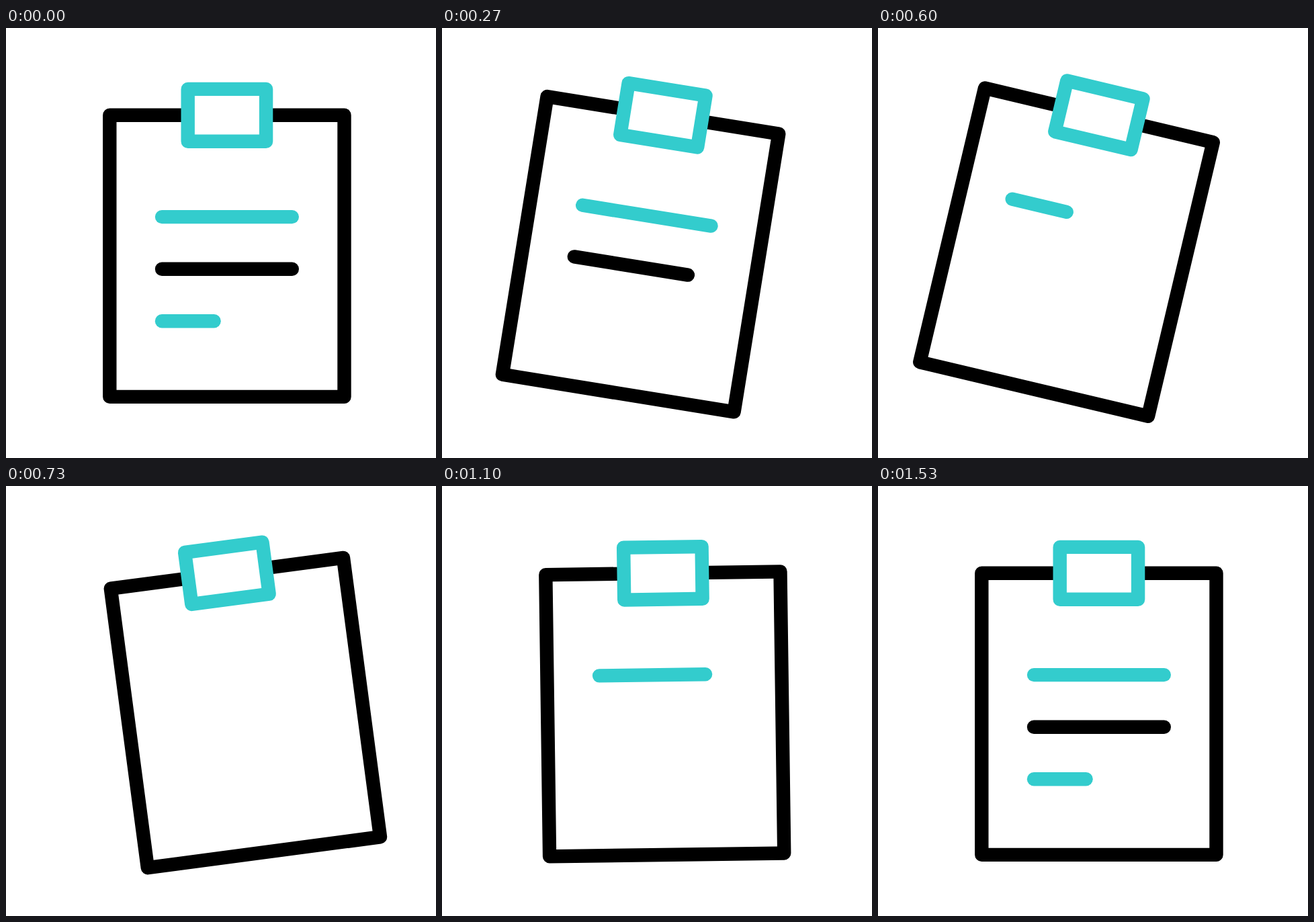
Animation, 640 px wide and 640 px high, one loop 2 s. Source, as an HTML page:

```html
<!DOCTYPE html>
<html lang="en">
<head>
<meta charset="utf-8">
<title>Clipboard</title>
<style>
  html, body { margin: 0; width: 100%; height: 100%; overflow: hidden; background: #fff; }
  svg { display: block; width: 100%; height: 100%; }
</style>
</head>
<body>
<svg viewBox="0 0 640 640" fill="none" stroke="#000" stroke-width="20.4" stroke-linecap="round" stroke-linejoin="round">
  <g id="board">
    <rect x="154.3" y="129.8" width="349.2" height="419.1"/>
    <rect x="270.7" y="90.9" width="116.4" height="77.8" fill="#fff" stroke="#33cccd"/>
    <path class="line" stroke="#33cccd"/>
    <path class="line"/>
    <path class="line" stroke="#33cccd"/>
  </g>
</svg>
<script>
const LOOP = 2000;
const PIVOT = '328.9 129.8';
const LEFT = 232;

// Keys are [time in ms, value]
const SWING = 18.25;
const tilt = [
  [34, 0], [507, SWING], [541, SWING], [763.5, -SWING / 2], [971.5, SWING / 4],
  [1157, -SWING / 8], [1348, SWING / 16], [1530, 0]
];
const lines = [
  { y: 281.1, length: 193.8, keys: [[444, 1], [731, 0], [789, 0], [1219, 1]] },
  { y: 358.7, length: 193.8, keys: [[210, 1], [497, 0], [1135, 0], [1420, 1]] },
  { y: 436.2, length: 77.6, keys: [[0, 1], [265, 0], [1330, 0], [1530, 1]] }
];

const board = document.getElementById('board');
const paths = document.querySelectorAll('.line');

const ease = s => s * s * (3 - 2 * s);

function valueAt(keys, t) {
  if (t <= keys[0][0]) return keys[0][1];
  for (let i = 1; i < keys.length; i++) {
    const [t0, a] = keys[i - 1];
    const [t1, b] = keys[i];
    if (t < t1) return a + (b - a) * ease((t - t0) / (t1 - t0));
  }
  return keys[keys.length - 1][1];
}

function draw(t) {
  board.setAttribute('transform', `rotate(${valueAt(tilt, t)} ${PIVOT})`);
  lines.forEach((line, i) => {
    const shown = valueAt(line.keys, t);
    paths[i].setAttribute('d', `M${LEFT} ${line.y}h${(line.length * shown).toFixed(3)}`);
    paths[i].setAttribute('visibility', shown > 0.001 ? 'visible' : 'hidden');
  });
}

const start = performance.now();
function tick() {
  draw((performance.now() - start) % LOOP);
  requestAnimationFrame(tick);
}
tick();
</script>
</body>
</html>
```
